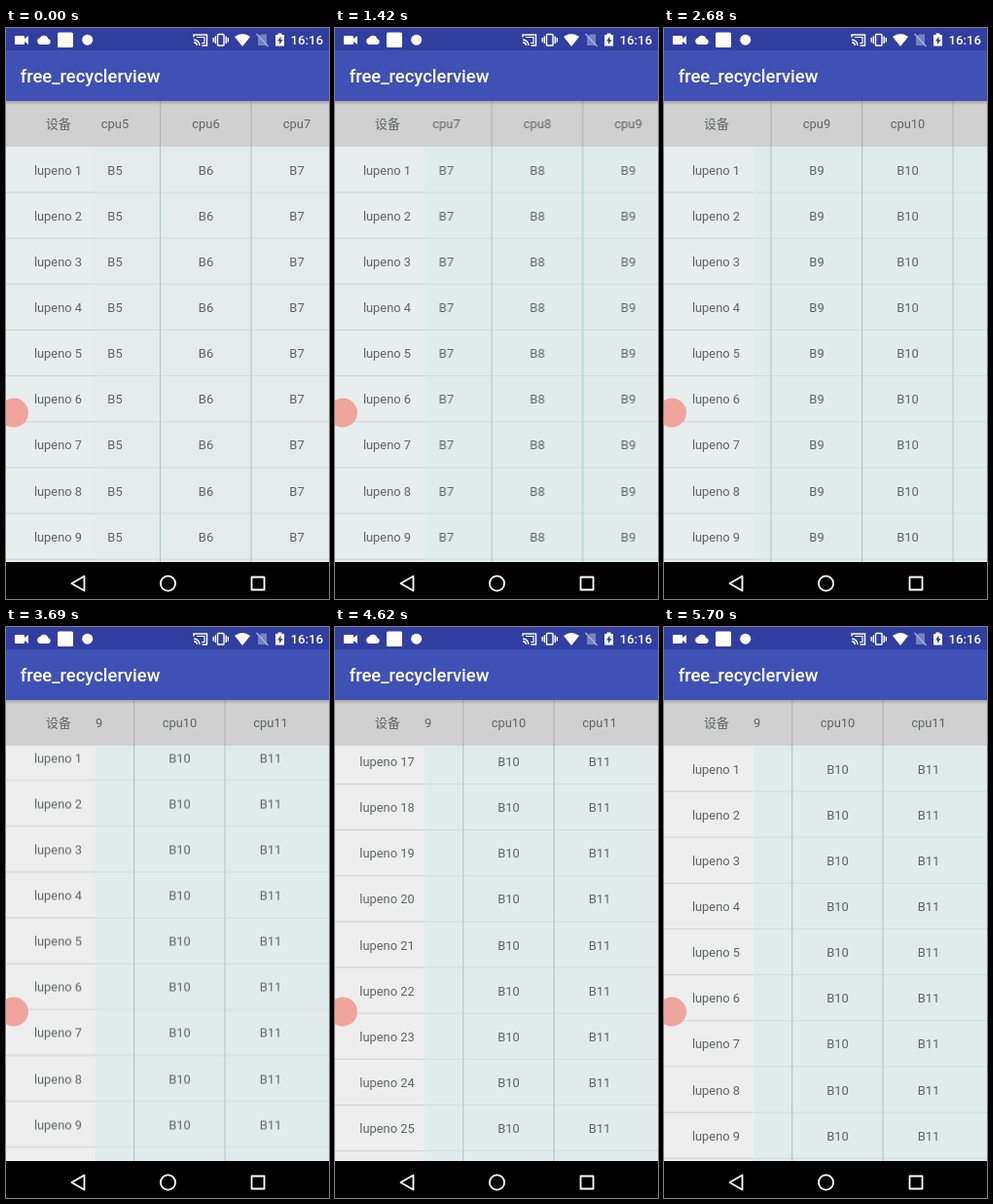
Recreate the animation shown at these times as an HTML page. Size 332 px wide and 587 px high, loop 6.16 s.

```html
<!DOCTYPE html>
<html lang="en">
<head>
<meta charset="utf-8">
<title>free_recyclerview</title>
<style>
  html, body { margin: 0; width: 100%; height: 100%; overflow: hidden; background: #000; }
  svg { display: block; width: 332px; height: 587px; }
  text { font: 12.9px Roboto, "Noto Sans CJK SC", "Noto Sans CJK", sans-serif; fill: #606464; text-anchor: middle; }
  .bar text { fill: #fff; font-weight: 500; text-anchor: start; }
</style>
</head>
<body>
<svg viewBox="0 0 332 587">
  <defs>
    <clipPath id="bodyClip"><rect y="122" width="332" height="427"/></clipPath>
    <clipPath id="colClip"><rect x="92" y="75" width="227.5" height="474"/></clipPath>
    <linearGradient id="shade" x2="0" y2="1">
      <stop stop-color="#000" stop-opacity=".22"/>
      <stop offset="1" stop-color="#000" stop-opacity="0"/>
    </linearGradient>
  </defs>

  <rect id="side" y="122" width="92" height="427" fill="#e7eeed"/>
  <rect id="sheet" x="92" y="122" width="240" height="427" fill="#e3eceb"/>
  <g clip-path="url(#bodyClip)">
    <g id="rows"></g>
    <g clip-path="url(#colClip)"><g id="cellsX"><g id="cellsY"></g></g></g>
  </g>

  <rect y="75" width="332" height="47" fill="#d0d0d0"/>
  <text x="54" y="103.4">设备</text>
  <g clip-path="url(#colClip)"><g id="heads"></g></g>
  <path id="glow" d="M0 75H332Q166 209 0 75Z" fill="#3f51b5" opacity="0"/>

  <g class="bar">
    <rect width="332" height="23.5" fill="#303f9f"/>
    <rect y="23" width="332" height="52" fill="#3f51b5"/>
    <rect y="75" width="332" height="4" fill="url(#shade)"/>
    <text x="14.7" y="56" style="font-size:18.4px">free_recyclerview</text>
    <text x="292.5" y="17" style="font-size:13.2px">16:16</text>
    <g fill="#fff">
      <path d="M10 8h8q1 0 1 1v2l4-3v9l-4-3v2q0 1-1 1h-8q-1 0-1-1V9q0-1 1-1Z"/>
      <path d="M35 17a3.6 3.6 0 0 1 0-7a4.7 4.7 0 0 1 8.5 1.2a3 3 0 0 1 0 5.8Z"/>
      <rect x="53" y="4.5" width="16" height="15.5" rx="1.5"/>
      <circle cx="83.7" cy="12.2" r="5.5"/>
      <path d="M235 9q8-6 16 0l-8 10Z"/>
      <path d="M279.500 7v-1.500h4v1.500h2.500v11.500h-9V7Z"/>
    </g>
    <path d="M282.500 8.500l-3.500 5h2v3.500l3.500-5h-2Z" fill="#303f9f"/>
    <g fill="none" stroke="#fff" stroke-width="1.4">
      <path d="M193 9.500V7h13.500v11h-5M193 12a6 6 0 0 1 6 6M193 14.700a3.300 3.300 0 0 1 3.300 3.300"/>
      <path d="M196 9.500h8v6h-3" stroke-width="1.1"/>
      <rect x="217.500" y="6.500" width="6.500" height="11.500" rx=".8"/>
      <path d="M215.300 8.500v7.500M213.200 10v4.500M226.200 8.500v7.500M228.300 10v4.500"/>
    </g>
    <path d="M262 6.500h6v11.500h-9v-8.500Z" fill="#7580c0"/>
    <path d="M257.500 6l12 13" stroke="#aab1dc" stroke-width="1.3"/>
  </g>

  <circle cx="8" cy="395.500" r="15" fill="#efa59e"/>

  <rect y="549" width="332" height="38" fill="#000"/>
  <g fill="none" stroke="#fff" stroke-width="1.8" stroke-linejoin="round">
    <path d="M80.500 563.500v15l-13-7.500Z"/>
    <circle cx="166.500" cy="571" r="7.600"/>
    <rect x="252.500" y="564.500" width="13" height="13"/>
  </g>
</svg>
<script>
  const LOOP = 6160, ROW = 47.15, COL = 93.5, ROWS = 30;
  const $ = id => document.getElementById(id);

  function add(parent, tag, attrs, text = '') {
    const el = document.createElementNS('http://www.w3.org/2000/svg', tag);
    for (const name in attrs) el.setAttribute(name, attrs[name]);
    el.textContent = text;
    $(parent).append(el);
  }

  const line = (parent, x, y, width, height, fill) =>
    add(parent, 'rect', { x, y, width, height, fill });

  for (let i = 0; i < ROWS; i++) {
    const y = 150.5 + i * ROW;
    line('rows', 0, y + 18, 92, 1, '#cdd2d1');
    line('rows', 92, y + 18, 240, 1, '#d0dcdb');
    add('rows', 'text', { x: 53.5, y }, `lupeno ${i + 1}`);
  }

  for (let n = 5; n <= 11; n++) {
    const x = 205.5 + (n - 6) * COL;
    add('heads', 'text', { x, y: 103.4 }, `cpu${n}`);
    for (let i = 0; i < ROWS; i++)
      add('cellsY', 'text', { x, y: 150.5 + i * ROW }, `B${n}`);
    if (n < 11) {
      line('heads', x + 46, 75, 1.2, 47, '#b5b5b5');
      line('cellsX', x + 46, 122, 1.2, 427, '#b6c6c6');
    }
  }

  // Hold each value until the next time in the table.
  function play(id, steps, style) {
    const keys = steps.map(([t, ...v]) => ({ offset: t / LOOP, easing: 'steps(1, end)', ...style(...v) }));
    keys.push({ ...keys[keys.length - 1], offset: 1 });
    $(id).animate(keys, { duration: LOOP, iterations: Infinity });
  }

  const scrollX = [
    [0, 0], [270, 20], [390, 56], [540, 72], [690, 84.5], [840, 130], [990, 167],
    [1420, 184.5], [1550, 239], [1690, 319], [1810, 320],
    [2680, 329], [2830, 387], [2980, 401]
  ];
  const scrollY = [
    [0, 0], [3690, 11.5], [3810, 90], [3960, 260], [4080, 420], [4230, 570], [4350, 676],
    [4500, 735], [4620, 762], [4770, 764], [4920, 560], [5040, 89.3], [5160, 0]
  ];
  const glow = [[0, 0, 0], [5160, .9, .16], [5280, 1, .13], [5430, .65, .09], [5550, .3, .05], [5700, 0, 0]];

  const moveX = x => ({ transform: `translate(${-x}px, 0px)` });
  const moveY = y => ({ transform: `translate(0px, ${-y}px)` });
  const fill = color => ({ fill: color });

  play('heads', scrollX, moveX);
  play('cellsX', scrollX, moveX);
  play('cellsY', scrollY, moveY);
  play('rows', scrollY, moveY);
  play('side', [[0, '#e7eeed'], [3690, '#eeeeee']], fill);
  play('sheet', [[0, '#e3eceb'], [540, '#e0ecec']], fill);
  play('glow', glow, (k, opacity) => ({ opacity, transform: `translate(0px, ${75 * (1 - k)}px) scale(1, ${k})` }));
</script>
</body>
</html>
```
